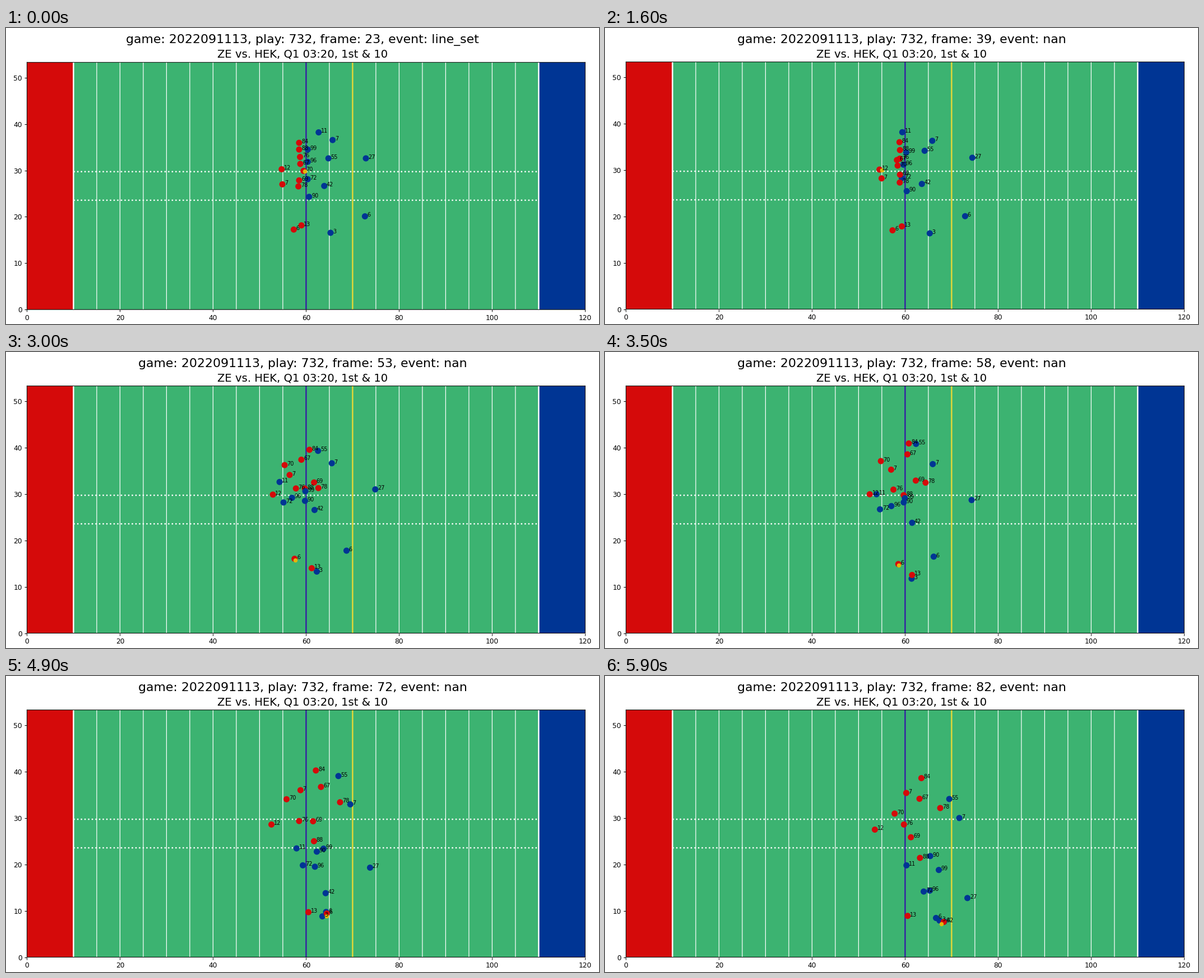
A matplotlib script for the animation above (6 s loop, 1058 by 529 pixels).

```python
import numpy as np
import matplotlib.pyplot as plt
from matplotlib.animation import FuncAnimation

plt.rcParams["path.snap"] = False   # keep thin lines at sub-pixel places

W, H = 1058, 529
LEFT, X_YARD, Y_YARD = 37.4, 8.3, 8.29   # pixels
LENGTH, WIDTH = 120, 53.3                # yards
FRAMES, FIRST = 60, 23
RED, BLUE, GREEN, GOLD = "#d50a0a", "#003594", "mediumseagreen", "#e0b80c"

EVENTS = {0: "line_set", 7: "ball_snap", 21: "pass_forward",
          27: "pass_arrived", 29: "pass_outcome_caught",
          47: "first_contact", 54: "tackle"}

KEYS = np.array([0, 7, 16, 25, 35, 49, 59])


def smooth_path(points):
    """Positions at every step, a monotone cubic through the key points."""
    p = np.array([[z.real, z.imag] for z in points])
    h = np.diff(KEYS)[:, None]
    s = np.diff(p, axis=0) / h
    m = np.empty_like(p)
    m[0], m[-1] = s[0], s[-1]
    a, b = s[:-1], s[1:]
    same = a * b > 0
    m[1:-1] = np.where(same, 2 * a * b / np.where(same, a + b, 1), 0)
    t = np.arange(FRAMES)
    i = np.clip(np.searchsorted(KEYS, t, side="right") - 1, 0, len(KEYS) - 2)
    u = ((t - KEYS[i]) / np.diff(KEYS)[i])[:, None]
    return (p[i] * (1 + 2 * u) * (1 - u) ** 2 + h[i] * m[i] * u * (1 - u) ** 2
            + p[i + 1] * u * u * (3 - 2 * u) + h[i] * m[i + 1] * u * u * (u - 1))


def linear_path(times, points):
    t = np.arange(FRAMES)
    z = np.array(points)
    return np.column_stack([np.interp(t, times, z.real),
                            np.interp(t, times, z.imag)])


players = []


def player(color, number, *points):
    path = smooth_path(points)
    players.append((color, number, path))
    return path


# Each point is x + y*j in yards at the matching key time; later players lie on top.
player(RED, 88, 58.5+34.5j, 58.4+34.4j, 58.9+34.3j, 59.75+32.45j, 59.7+29.75j, 61.7+25j, 63.2+21.4j)
player(RED, 67, 58.75+31.4j, 58.75+31.4j, 58.25+32.15j, 58+35.4j, 60.5+38.55j, 63.2+36.7j, 63.1+34.15j)
player(RED, 70, 59.45+29.9j, 59.4+29.9j, 58.4+30.95j, 56.45+34.6j, 54.8+37.1j, 55.8+34.05j, 57.75+30.95j)
player(BLUE, 11, 62.7+38.2j, 62+38.45j, 59.4+38.15j, 55.3+35.05j, 53.85+29.95j, 57.95+23.45j, 60.3+19.8j)
player(BLUE, 7, 65.7+36.55j, 65.95+36.45j, 65.85+36.3j, 65.35+36.7j, 65.95+36.45j, 69.5+32.95j, 71.65+30j)
player(BLUE, 99, 60.35+34.5j, 60.35+34.4j, 60.25+33.8j, 59.8+31.9j, 59.95+29.1j, 63.75+23.4j, 67.25+18.8j)
player(BLUE, 55, 64.8+32.6j, 64.45+32.9j, 64.2+34.15j, 63+36.95j, 62.35+40.8j, 66.95+39.05j, 69.5+34.1j)
player(BLUE, 27, 72.85+32.6j, 73.55+32.6j, 74.45+32.65j, 75.3+32.3j, 74.3+28.7j, 73.75+19.3j, 73.4+12.75j)
player(BLUE, 96, 60.35+31.85j, 60.25+31.85j, 59.65+31.15j, 56.95+30.35j, 57.05+27.4j, 61.9+19.5j, 65.3+14.35j)
player(BLUE, 72, 60.35+28.1j, 60.2+28.1j, 59.3+28.25j, 56.25+28.9j, 54.6+26.7j, 59.3+19.8j, 64+14.15j)
player(BLUE, 42, 63.9+26.65j, 63.85+26.65j, 63.6+27j, 62.4+28j, 61.5+23.8j, 64.2+13.8j, 68.4+7.65j)
player(BLUE, 90, 60.65+24.3j, 60.35+24.5j, 60.35+25.45j, 59.9+28.65j, 59.7+28.2j, 62.3+22.75j, 65.4+21.8j)
player(BLUE, 6, 72.65+20.1j, 72.9+20.45j, 72.9+20.05j, 71.35+18.75j, 66.15+16.5j, 64.3+9.75j, 66.65+8.45j)
player(BLUE, 3, 65.25+16.55j, 65.25+16.55j, 65.3+16.35j, 63.7+14.75j, 61.4+11.75j, 63.5+8.8j, 67.4+7.9j)
player(RED, 84, 58.5+35.95j, 58.5+35.9j, 58.8+36j, 60.65+37.6j, 60.8+40.9j, 62.1+40.25j, 63.5+38.6j)
player(RED, 76, 58.7+32.9j, 58.7+32.9j, 58.85+32.45j, 58.3+31.45j, 57.5+30.95j, 58.5+29.35j, 59.75+28.6j)
player(RED, 69, 58.5+27.85j, 58.5+27.85j, 58.9+29j, 60.7+31.65j, 62.3+32.9j, 61.5+29.3j, 61.25+25.85j)
player(RED, 78, 58.35+26.55j, 58.35+26.55j, 58.85+27.3j, 60.85+29.7j, 64.4+32.45j, 67.3+33.4j, 67.55+32.15j)
player(RED, 12, 54.75+30.25j, 54.85+30.25j, 54.5+30.1j, 53.6+29.8j, 52.4+29.95j, 52.55+28.6j, 53.5+27.5j)
player(RED, 7, 54.9+27j, 54.9+27j, 54.95+28.2j, 55.95+32.3j, 57+35.25j, 58.8+36j, 60.25+35.4j)
player(RED, 13, 59+18.15j, 59.05+18.2j, 59.3+17.85j, 60.65+15.55j, 61.5+12.55j, 60.5+9.7j, 60.55+8.9j)
carrier = player(RED, 6, 57.35+17.25j, 57.4+17.15j, 57.3+17j, 57.05+16.7j, 58.55+14.9j, 64.45+9.4j, 68.3+7.6j)

# Snap, hold, throw; after the catch the ball stays with its carrier.
CATCH = 28
ball = linear_path([0, 7, 13, 16, 21, 25, CATCH],
                   [59.7+29.8j, 59.65+29.8j, 55.2+30.1j, 55+29.95j,
                    54.1+29.7j, 55.85+21.2j, 57.2+16.2j])
held = carrier + linear_path([CATCH, 35, 49, 59],
                             [0.1-0.3j, 0.1-0.25j, -0.1-0.5j, -0.55-0.4j])
ball[CATCH:] = held[CATCH:]

fig = plt.figure(figsize=(12, 6), dpi=W / 12, facecolor="white")
ax = fig.add_axes([0, 0, 1, 1], facecolor=GREEN)
ax.set_xlim(0, LENGTH)
ax.set_ylim(0, WIDTH)

ax.axvspan(0, 10, color=RED, lw=0)
ax.axvspan(110, 120, color=BLUE, lw=0)
for x in range(10, 111, 5):
    ax.axvline(x, color="white", lw=2 if x in (10, 110) else 1)
ax.hlines([23.57, 29.73], 10, 110, color="white", ls=":", lw=2, zorder=2)
ax.axvline(60, color="#3420a0", lw=2)
ax.axvline(70, color="#e0d736", lw=2)

title = fig.suptitle("", fontsize=18)
fig.text(0.5, 0.9, "ZE vs. HEK, Q1 03:20, 1st & 10", fontsize=16, ha="center")

dots = ax.scatter(np.zeros(len(players)), np.zeros(len(players)), s=82, lw=0,
                  c=[color for color, _, _ in players], zorder=3)
ball_dot = ax.scatter([0], [0], s=38, lw=0, c=GOLD, zorder=4)
labels = [ax.text(0, 0, str(number), fontsize=8, zorder=5)
          for _, number, _ in players]


def place_axes(bottom):
    ax.set_position([LEFT / W, 1 - bottom / H,
                     LENGTH * X_YARD / W, WIDTH * Y_YARD / H])


def draw(k):
    event = EVENTS.get(k, "nan")
    title.set_text(f"game: 2022091113, play: 732, frame: {FIRST + k}, event: {event}")
    # A title with an underscore is taller and pushes the field down.
    place_axes(503.2 if "_" in event else 502.5)
    spots = np.array([path[k] for _, _, path in players])
    dots.set_offsets(spots)
    ball_dot.set_offsets(ball[k:k + 1])
    for label, (x, y) in zip(labels, spots):
        label.set_position((x + 0.5, y - 0.1))
    return [title, dots, ball_dot, *labels]


anim = FuncAnimation(fig, draw, frames=FRAMES, init_func=lambda: draw(0),
                     interval=100, repeat=True, repeat_delay=0, blit=False)
plt.show()
```
